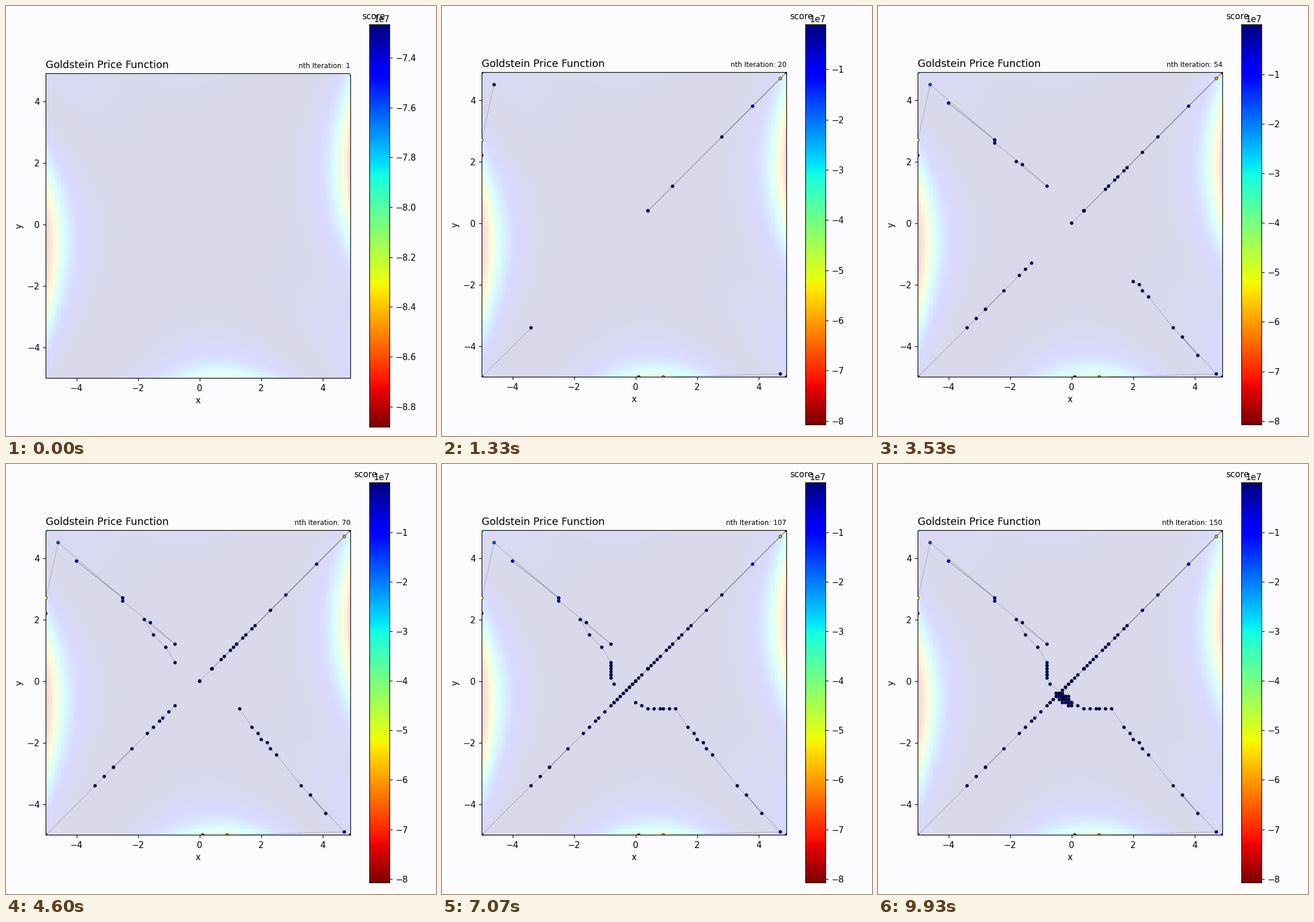
A matplotlib script for the animation above (9990 ms loop, 748 px wide and 748 px high).

```python
import numpy as np
import matplotlib.pyplot as plt
from matplotlib.animation import FuncAnimation

SIZE = 748
BG = "#fcfcfe"
STEPS = 150
CMAP = plt.get_cmap("jet_r")
rng = np.random.default_rng(4)


def score(x, y):
    """Negative Goldstein-Price value."""
    a = 1 + (x + y + 1) ** 2 * (
        19 - 14 * x + 3 * x**2 - 14 * y + 6 * x * y + 3 * y**2)
    b = 30 + (2 * x - 3 * y) ** 2 * (
        18 - 32 * x + 12 * x**2 + 48 * y - 36 * x * y + 27 * y**2)
    return -a * b


def walk(*keys, moves=30):
    """Grid walk through keys (move, x[, y]); y equals x when left out.

    After the last key the walk scatters around the optimum.
    """
    when = [k[0] for k in keys]
    n = np.arange(when[-1] + 1)
    leg = np.column_stack([np.interp(n, when, [k[1] for k in keys]),
                           np.interp(n, when, [k[-1] for k in keys])])
    s = rng.random((moves - len(n), 1))
    end = (-0.5, -0.35) + s * (0.45, -0.4) + rng.uniform(-0.1, 0.1, (len(s), 2))
    return np.round(np.vstack([leg, end]), 1)


# Five searchers that take turns, one move per iteration.
paths = [
    walk((0, 4.9), (1, 4.7), (3, 2.8), (5, 1.8), (13, 0.7), (21, -0.2)),
    walk((0, -5, 4.9), (1, -5, 2.2), (2, -5, 2.7), (3, -4.6, 4.5),
         (4, -2.5, 2.7), (5, -4, 3.9), (6, -2.5, 2.7), (7, -2.5, 2.6),
         (9, -0.8, 1.2), (10, -1.8, 2), (13, -0.8, 0.6), (20, -0.8, 0.1),
         (21, -0.7, -0.1)),
    walk((0, 4.9, -5), (1, 0.1, -5), (2, 0.9, -5), (3, 4.7, -4.9),
         (4, 3.6, -3.7), (5, 4.1, -4.3), (7, 2.5, -2.4), (12, 1.7, -1.5),
         (13, 1.3, -0.9), (18, 0.4, -0.9), (20, 0, -0.7)),
    walk((0, -5), (2, -5), (3, -3.4), (5, -2.8), (6, -2.2), (7, -2.8),
         (8, -1.7), (13, -0.8), (20, -0.4)),
    walk((0, 0.4), (1, 4.9), (2, 1.2), (3, 0.4), (8, 0.4), (9, 0),
         (13, 0), (20, -0.4)),
]
scores = [score(*p.T) for p in paths]

fig = plt.figure(figsize=(7, 7), dpi=SIZE / 7, facecolor=BG)


def place(axes, left, top, right, bottom):
    axes.set_position([left / SIZE, 1 - bottom / SIZE,
                       (right - left) / SIZE, (bottom - top) / SIZE])


ax = fig.add_axes([0.1, 0.1, 0.7, 0.7], facecolor="white")
grid = np.arange(100) * 0.1 - 5
cols, rows = np.meshgrid(grid, grid)
ax.imshow(score(rows, cols), origin="lower", extent=(-5, 4.9, -5, 4.9),
          cmap=CMAP, alpha=0.15, aspect="auto", interpolation="nearest",
          zorder=0)
ax.set(xlabel="x", ylabel="y", xlim=(-5, 4.9), ylim=(-5, 4.9))
ax.set_title("Goldstein Price Function", loc="left", fontsize=12)
counter = ax.set_title("", loc="right", fontsize=8)

lines = [ax.plot([], [], "--", color="black", lw=0.5, alpha=0.4)[0]
         for _ in paths]
dots = [ax.scatter([], [], s=12, edgecolors="black", linewidths=0.5, zorder=3)
        for _ in paths]

cax = fig.add_axes([0.85, 0.1, 0.05, 0.8])
bar = cax.imshow(np.linspace(0, 1, 256)[:, None], origin="lower",
                 extent=(0, 1, 0, 1), cmap=CMAP, aspect="auto")
cax.set_xticks([])
cax.yaxis.tick_right()
label = fig.text(0, 1 - 23 / SIZE, "score", ha="center", fontsize=10)


def update_bar(values):
    lo, hi = values.min(), values.max()
    if lo == hi:
        lo, hi = 1.1 * lo, 0.9 * hi
    bar.set_extent((0, 1, lo, hi))
    cax.set_ylim(lo, hi)

    # A tick label close to the lower end lifts the whole layout.
    gap = 700 * (-8e7 - lo) / (hi - lo)
    top, bottom = 32.4, 732.3 - max(0, 10.5 - gap)
    middle = (top + bottom) / 2
    place(cax, 632.3, top, 632.3 + (bottom - top) / 20, bottom)
    place(ax, 69.2, middle - 265, 599.2, middle + 265)

    # The label follows the width of the tick labels.
    center = {1: 639.5, 2: 649}.get(len(values), 625)
    label.set_x(center / SIZE)
    return lo, hi


def draw(frame):
    counter.set_text(f"nth Iteration: {frame + 1}")
    for i, (path, vals) in enumerate(zip(paths, scores)):
        n = (frame - i) // 5 + 1 if frame >= i else 0
        lines[i].set_data(*path[:n].T)
        dots[i].set_offsets(path[:n])
        if n == 0:
            continue
        seen = vals[:n]
        lo, hi = update_bar(seen) if i == 0 else (seen.min(), seen.max())
        dots[i].set_facecolors(CMAP((seen - lo) / ((hi - lo) or 1)))
    return []


anim = FuncAnimation(fig, draw, frames=STEPS, interval=9990 / STEPS,
                     repeat=True, repeat_delay=0, blit=False)
plt.show()
```
